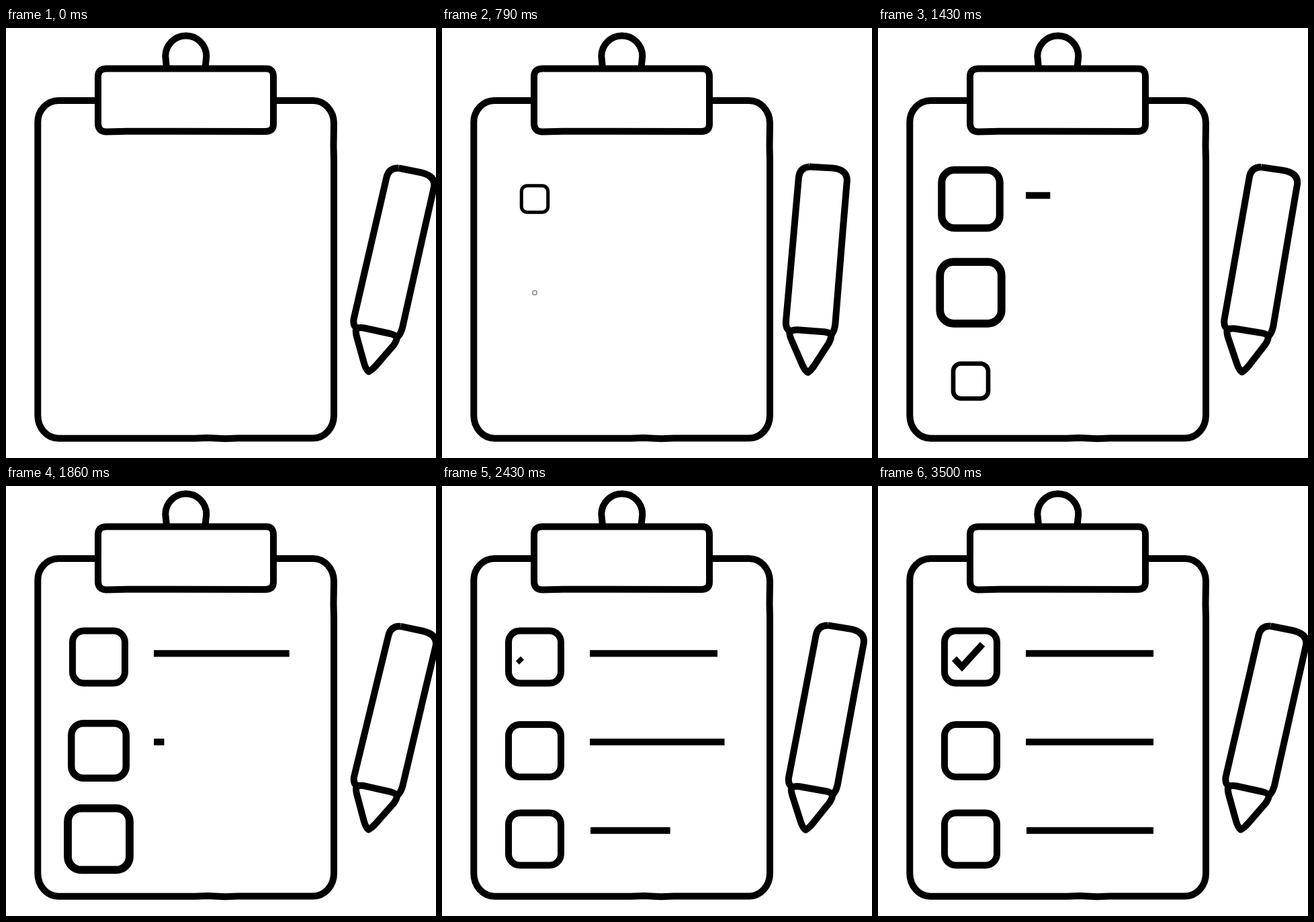
Recreate the animation shown at these times as an HTML page. Size 640 by 640 pixels, loop 3.57 s.

```html
<!DOCTYPE html>
<html lang="en">
<head>
<meta charset="utf-8">
<title>Checklist</title>
<style>
html, body { margin: 0; width: 100%; height: 100%; overflow: hidden; background: #fff; }
svg { display: block; width: 100%; height: 100%; }
</style>
</head>
<body>
<svg viewBox="0 0 640 640" fill="none" stroke="#000" stroke-width="10">
  <path d="M78 108H457A31 34 0 0 1 488 142L487.500 176L488 196V576A31 34 0 0 1 457 610.500H345L326 611.300L300 610L281 610.700H78A31 34 0 0 1 47.300 576V140A31 32 0 0 1 78 108Z"/>
  <path d="M239 59L237.300 42A30.500 30.500 0 1 1 298.300 42L296.500 59"/>
  <path fill="#fff" d="M149 60.500H387Q398 60.500 398 72V143Q398 154 386 154L180 153.800L149 154.500Q137 154 137 142V72Q137 61 149 60.500Z"/>
  <g id="boxes"></g>
  <g id="lines"></g>
  <path id="tick" pathLength="1" d="M113.500 257L125 269L155.500 235.500"/>
  <g id="pencil">
    <path d="M584.500 208.500Q570 208 566.500 222L517.600 433Q516 444 523 447"/>
    <path d="M584.500 208.500L617 215Q640 220 637 237L620 312L590 446Q586 460 581 460"/>
    <path stroke-linejoin="round" d="M582 461Q580 457 572 455L533 446.500Q523 445 521 449Q520 453 523 463L533 499Q536 509 540 511.500Q546 508 551 502L577 472Q582 465 582 459"/>
  </g>
</svg>
<script>
const FPS = 14, FRAMES = 50, LOOP = 3570;
const get = id => document.getElementById(id);

// Cosine ease from 0 to 1, clamped outside
const ease = x => (1 - Math.cos(Math.PI * Math.min(1, Math.max(0, x)))) / 2;

// Grow from 0 to peak, then settle at 1
const pop = (t, rise, peak, settle, power) => t <= 0 ? 0 :
  peak * ease((t / rise) ** power) + (1 - peak) * ease((t - rise) / settle);

// Turning points of the pencil: [frame, degrees]
const turns = [[0, 0], [12.25, -8.2], [26.3, .64], [35, -2.3], [49, 0]];

const swing = f => turns.slice(1).reduce((angle, [end, to], i) => {
  const [start, from] = turns[i];
  return angle + (to - from) * ease((f - start) / (end - start));
}, 0);

// One row per item: box centre, box start, line left, line height, line start
const rows = [
  [254.5, 0, 220, 249.3, 17.5],
  [394, 4.4, 220, 381, 24.4],
  [525.5, 8, 221, 512.7, 29],
];

get('boxes').innerHTML =
  '<rect x="-39" y="-39" width="78" height="78" rx="17"/>'.repeat(rows.length);
get('lines').innerHTML = rows.map(([, , x]) => `<path d="M0 0H${410 - x}"/>`).join('');

function place(node, scale, transform) {
  node.style.display = scale > 0 ? '' : 'none';
  node.setAttribute('transform', transform);
}

function render(now) {
  const f = Math.floor((now % LOOP + 5) * FPS / 1000) % FRAMES;
  rows.forEach(([boxY, boxStart, x, y, lineStart], i) => {
    const size = pop(f - boxStart, 16.4, 1.2, 7.6, 2);
    const width = pop(f - lineStart, 9, 1.07, 2, 1);
    place(get('boxes').children[i], size, `translate(138 ${boxY}) scale(${size})`);
    place(get('lines').children[i], width, `translate(${x} ${y}) scale(${width} 1)`);
  });
  const drawn = ease((f - 30) / 18);
  place(get('tick'), drawn, '');
  get('tick').setAttribute('stroke-dasharray', drawn < 1 ? `${drawn} 2` : 'none');
  get('pencil').setAttribute('transform', `rotate(${swing(f)} 551 477)`);
}

const begin = performance.now();
function loop() {
  render(performance.now() - begin);
  requestAnimationFrame(loop);
}
loop();
</script>
</body>
</html>
```
